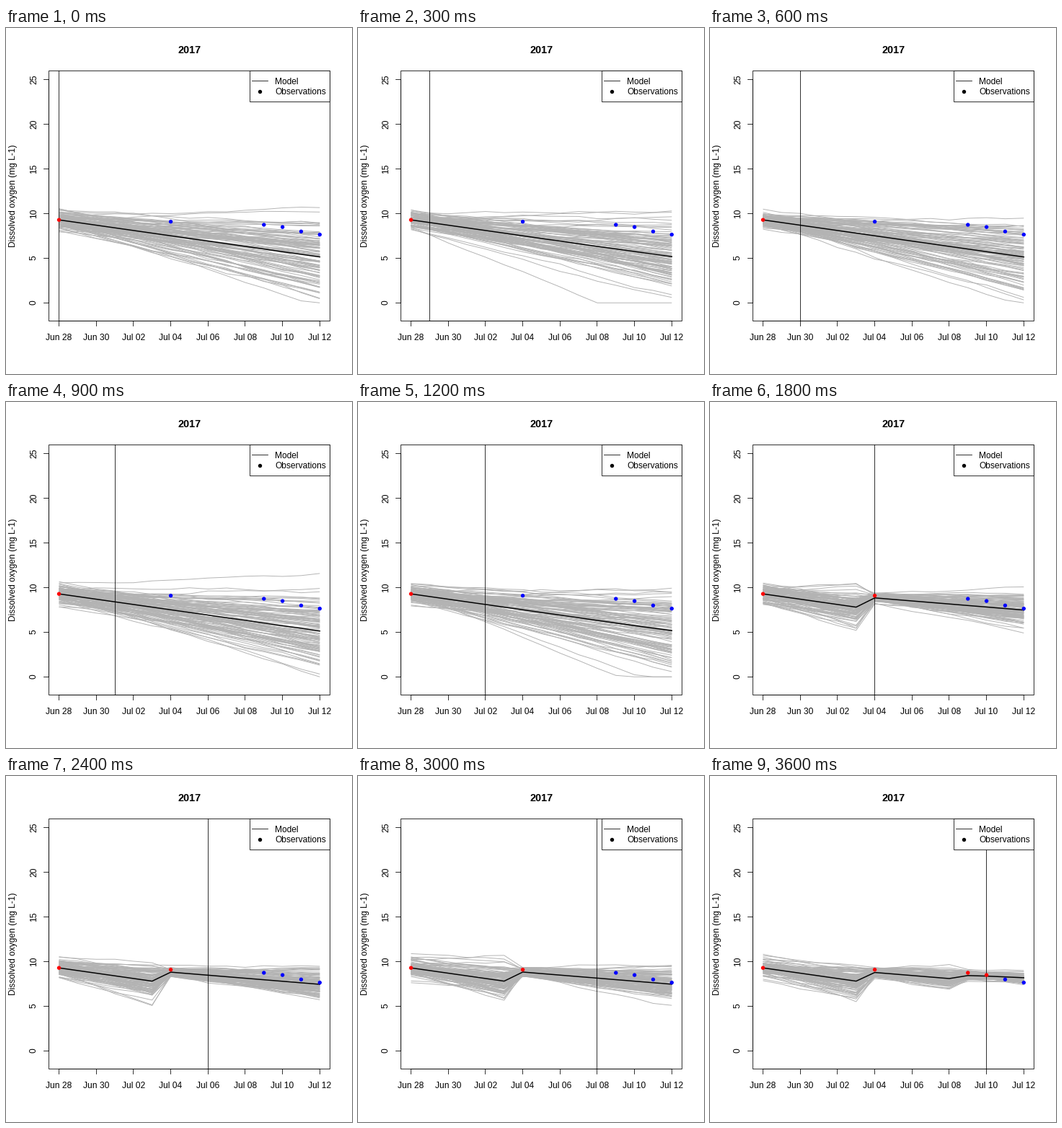
Animation, 480 px wide and 480 px high, one loop 3900 ms. Source, as a matplotlib script:

```python
import matplotlib.pyplot as plt
import numpy as np
from matplotlib.animation import FuncAnimation
from matplotlib.collections import LineCollection
from matplotlib.patches import Rectangle

plt.rcParams["font.family"] = "Liberation Sans"

SIZE, DPI = 480, 96
PX = 72 / DPI
LEFT, RIGHT, TOP, BOTTOM = 59, 449, 59, 406
THIN = 0.8

DAYS = np.arange(15)
MEMBERS = 100
OBS = {0: 9.3, 6: 9.1, 11: 8.75, 12: 8.5, 13: 8.0, 14: 7.65}
OBS_VAR = 0.25
LOSS = 0.297       # mean oxygen loss per day
LOSS_GAIN = 0.08   # how far an update corrects the loss


def sx(day):
    return 73.51 + 25.842 * np.asarray(day)


def sy(value):
    return 381.3 - 12.376 * np.asarray(value)


def centred(rng, sd):
    values = rng.normal(0, sd, MEMBERS)
    return values - values.mean()


def ensemble(step):
    """Ensemble Kalman forecast using the observations up to the given day."""
    rng = np.random.default_rng(40 + step)
    state = OBS[0] + centred(rng, 0.55)
    loss = LOSS + centred(rng, 0.15)
    paths = [state]
    for day in DAYS[1:]:
        state = np.maximum(state - loss + centred(rng, 0.1), 0)
        if day in OBS and day <= step:
            gain = state.var() / (state.var() + OBS_VAR)
            miss = OBS[day] + centred(rng, 0.2) - state
            state = state + gain * miss
            loss = loss - LOSS_GAIN * miss
        paths.append(state)
    return np.array(paths).T


fig = plt.figure(figsize=(SIZE / DPI, SIZE / DPI), dpi=DPI, facecolor="white")
ax = fig.add_axes([0, 0, 1, 1])
ax.set(xlim=(0, SIZE), ylim=(SIZE, 0))
ax.axis("off")


def line(x, y, width=THIN, **kw):
    return ax.plot(x, y, color="black", lw=width * PX, **kw)[0]


def label(x, y, text, size=12, **kw):
    ax.text(x, y, text, fontsize=size * PX, va="baseline",
            rotation_mode="anchor", zorder=9, **kw)


def box(x0, y0, x1, y1, **kw):
    ax.add_patch(Rectangle((x0, y0), x1 - x0, y1 - y0, ec="black",
                           lw=THIN * PX, **kw))


def dots(x, y, color, z=5):
    return ax.scatter(x, y, s=(5.4 * PX) ** 2, c=color, lw=0, zorder=z)


# Frame, axes and labels
box(LEFT, TOP, RIGHT, BOTTOM, fc="none", zorder=6)
line(np.floor(sx([0, 14])), [BOTTOM, BOTTOM])
line([LEFT, LEFT], np.floor(sy([0, 25])))
for day in range(0, 15, 2):
    x = sx(day)
    line([np.floor(x)] * 2, [BOTTOM, BOTTOM + 7])
    name = f"Jun {28 + day}" if day < 3 else f"Jul {day - 2:02d}"
    label(x, 432.7, name, ha="center")
for value in range(0, 26, 5):
    y = sy(value)
    line([LEFT - 7, LEFT], [np.floor(y)] * 2)
    label(42, y - 0.6, str(value), ha="center", rotation=90)
label(254.4, 35, "2017", 14.4, ha="center", weight="bold")
label(13, 232.8, "Dissolved oxygen (mg L-1)", ha="center", rotation=90)

# Legend
box(338, TOP, RIGHT, 102, fc="white", zorder=7)
line([341, 363], [73, 73], zorder=8)
dots([352], [87.8], "black", 8)
label(373.3, 78, "Model", ha="left")
label(373.3, 92.4, "Observations", ha="left")

# Moving parts
spread = LineCollection([], colors="#b3b3b3", linewidths=0.95 * PX, zorder=2)
ax.add_collection(spread, autolim=False)
model = line([], [], 1.5, zorder=3)
today = line([], [], zorder=4)
obs_days = np.array(list(OBS))
points = dots(sx(obs_days), sy(list(OBS.values())), ["blue"] * len(OBS))


def update(step):
    members = ensemble(step)
    spread.set_segments([np.column_stack([sx(DAYS), sy(m)]) for m in members])
    model.set_data(sx(DAYS), sy(members.mean(axis=0)))
    today.set_data([np.floor(sx(step))] * 2, [TOP, BOTTOM])
    points.set_facecolor(["red" if d <= step else "blue" for d in obs_days])


anim = FuncAnimation(fig, update, frames=13, interval=300, repeat=True)
plt.show()
```
